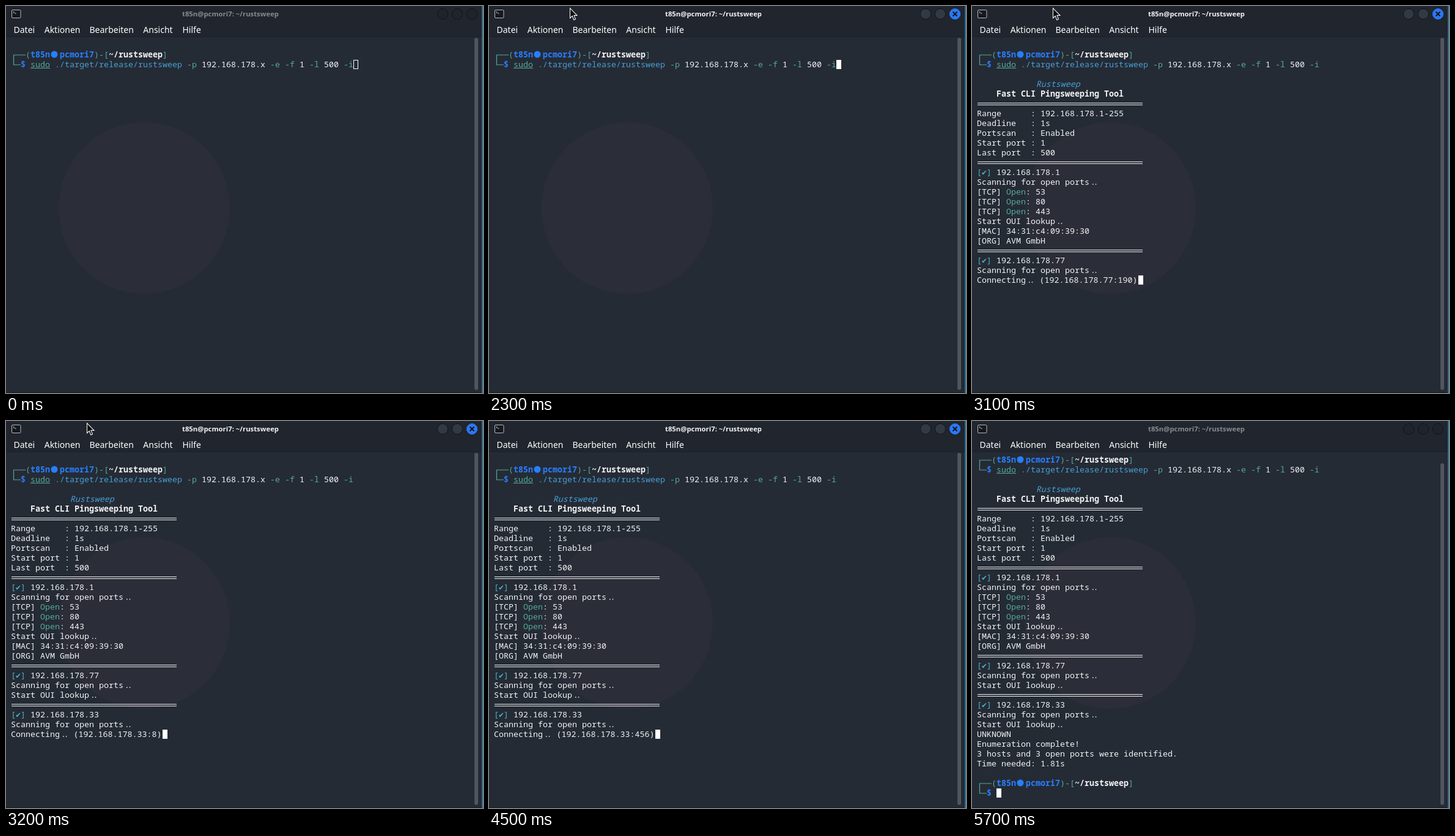
These frames come from a looping animation (780 px wide and 632 px high, 5800 ms). An HTML page:

```html
<!DOCTYPE html>
<html lang="de">
<head>
<meta charset="utf-8">
<title>rustsweep</title>
<style>
html, body { margin: 0; width: 100%; height: 100%; overflow: hidden; background: #252b35; }
svg { display: block; width: 780px; height: 632px; }
text { white-space: pre; }
.mono { font: 13.333px "Noto Sans Mono", "DejaVu Sans Mono", monospace; fill: #f2f3f4; }
.menu { font: 500 14px "Noto Sans", "Open Sans", sans-serif; fill: #fff; }
.title { font: 700 11.33px "Noto Sans", "Open Sans", sans-serif; fill: #868a90; text-anchor: middle; }
.focus .title { fill: #f2f3f4; }
.b { font-weight: 700; }
.i { font-style: italic; }
.green { fill: #54a99a; }
.cyan { fill: #469fd4; }
.teal { fill: #4eb0c0; }
.blue { fill: #277fff; }
.rule { fill: #f2f3f4; }
.frame { fill: none; stroke: #54a99a; stroke-width: 1.2; }
.btn { fill: #1f242c; stroke: #11141a; }
.focus .btn { fill: #323945; }
.focus .close { fill: #2a78f5; stroke: #2a78f5; }
.cross { stroke: #10151d; stroke-width: 2; display: none; }
.focus .cross { display: inline; }
</style>
</head>
<body>
<svg viewBox="0 0 780 632">
  <rect width="780" height="632" fill="#252b35"/>
  <circle cx="226" cy="330" r="140" fill="#2b2d38"/>
  <rect width="780" height="51" fill="#20252e"/>
  <rect y="50" width="780" height="1" fill="#1c2129"/>
  <rect x="778" width="2" height="632" fill="#2f7196"/>
  <rect y="631" width="778" height="1" fill="#171b22"/>
  <g id="bar">
    <rect x="9.5" y="6.5" width="14.5" height="13" rx="1.5" fill="#15181d" stroke="#b9bcc0"/>
    <path d="M11.8 9l1.6 1.3-1.6 1.3M14.2 12h2.2" fill="none" stroke="#e4e5e6"/>
    <text class="title" x="367" y="17">t85n@pcmori7: ~/rustsweep</text>
    <circle class="btn" cx="714" cy="13" r="8.6"/>
    <circle class="btn" cx="738" cy="13" r="8.6"/>
    <circle class="btn close" cx="762" cy="13" r="8.6"/>
    <path class="cross" d="M758.5 9.5l7 7m0-7l-7 7"/>
  </g>
  <g class="menu">
    <text x="12.5" y="43.5">Datei</text>
    <text x="62.7" y="43.5">Aktionen</text>
    <text x="136.5" y="43.5">Bearbeiten</text>
    <text x="224.3" y="43.5">Ansicht</text>
    <text x="288.5" y="43.5">Hilfe</text>
  </g>
  <rect id="scroll" x="766" y="52" width="6" height="575" rx="3" fill="#50555e"/>
  <g id="screen" class="mono"></g>
  <path id="mouse" d="M0 0V16.2L3.7 12.8 6.3 19.2 9 18 6.4 11.9H11.5Z" fill="#0a0a0a" stroke="#f5f5f5" stroke-width="1.1"/>
</svg>
<script>
const LOOP = 5800, CELL = 8, ROW = 16;
const $ = id => document.getElementById(id);
const colX = c => 8 + c * CELL;
const midY = r => 63 + r * ROW;

// A pair of dots is set tighter, as in a ligature font
const dots = s => s.replace(/\.\.(?=$| )/, '<tspan dx="1.7">.</tspan><tspan dx="-3.2">.</tspan>');
const put = (row, col, str, cls = '') =>
  `<text class="${cls}" x="${colX(col)}" y="${midY(row) + 5}">${dots(str)}</text>`;
const rule = row => [-1, 2].map(d =>
  `<rect class="rule" x="9" y="${midY(row) + d}" width="270" height="1"/>`).join('');
const host = (row, ip) =>
  put(row, 0, '[✔]', 'teal') + put(row, 4, ip) + put(row + 1, 0, 'Scanning for open ports..');
const port = (row, n) =>
  put(row, 0, '[TCP]') + put(row, 6, 'Open', 'green') + put(row, 10, ': ' + n);
const field = (row, name, value) => put(row, 0, name.padEnd(11) + ': ' + value);
const lookup = row => put(row, 0, 'Start OUI lookup..');
const connect = (row, ip, n) => {
  const s = `Connecting.. (${ip}:${n})`;
  return put(row, 0, s) + cursor(row, s.length, true);
};

function cursor(row, col, solid) {
  const x = colX(col), y = midY(row) - 7;
  return solid
    ? `<rect x="${x}" y="${y}" width="8" height="15" fill="#fff"/>`
    : `<rect x="${x + .5}" y="${y + .5}" width="7" height="14" fill="none" stroke="#fff"/>`;
}

function prompt(row) {
  const y = midY(row);
  return `<path class="frame" d="M32 ${y + 1}H12.5V${y + 17}H24"/>` +
    put(row, 3, '(', 'green') + put(row, 4, 't85n', 'blue b') +
    `<circle class="blue" cx="79" cy="${y}" r="5.5"/>` +
    put(row, 10, 'pcmori7', 'blue b') + put(row, 17, ')-[', 'green') +
    put(row, 20, '~/rustsweep', 'b') + put(row, 31, ']', 'green') +
    put(row + 1, 2, '$', 'blue b');
}

const command = prompt(1) +
  put(2, 4, 'sudo', 'green') + `<rect class="green" x="40" y="${midY(2) + 6}" width="32" height="1"/>` +
  put(2, 9, './target/release/rustsweep', 'cyan') +
  put(2, 36, '-p', 'green') + put(2, 39, '192.168.178.x') +
  put(2, 53, '-e -f', 'green') + put(2, 59, '1') +
  put(2, 61, '-l', 'green') + put(2, 64, '500') + put(2, 68, '-i', 'green');

const header = put(4, 12.1, 'Rustsweep', 'cyan i') + put(5, 4, 'Fast CLI Pingsweeping Tool', 'b') +
  rule(6) + field(7, 'Range', '192.168.178.1-255') + field(8, 'Deadline', '1s') +
  field(9, 'Portscan', 'Enabled') + field(10, 'Start port', 1) + field(11, 'Last port', 500) +
  rule(12) + host(13, '192.168.178.1');

const second = lookup(18) + put(19, 0, '[MAC] 34:31:c4:09:39:30') + put(20, 0, '[ORG] AVM GmbH') +
  rule(21) + host(22, '192.168.178.77');

const third = lookup(24) + rule(25) + host(26, '192.168.178.33');

const summary = lookup(28) + put(29, 0, 'UNKNOWN') + put(30, 0, 'Enumeration complete!') +
  put(31, 0, '3 hosts and 3 open ports were identified.') + put(32, 0, 'Time needed: 1.81s') +
  prompt(34) + cursor(35, 4, true);

function content(t) {
  if (t < 2800) return command + cursor(2, 70, t >= 2200);
  let out = command + header;
  const first = 1 + Math.round((t - 2800) * 2);
  const open = [53, 80, 443].filter(n => n < first || t >= 3050);
  out += open.map((n, i) => port(15 + i, n)).join('');
  if (t < 3050) return out + connect(15 + open.length, '192.168.178.1', first);
  out += second;
  if (t < 3180) return out + connect(24, '192.168.178.77', Math.round((t - 3050) * 3.8));
  out += third;
  if (t < 4600) return out + connect(28, '192.168.178.33', Math.round(8 + (t - 3200) * 448 / 1300));
  return out + summary;
}

function moveMouse(t) {
  const k = Math.min(1, (t - 1900) / 400), ease = k * (2 - k);
  const drift = Math.max(0, Math.min(1, (t - 3400) / 500));
  const x = 125.5 + 7 * ease + 3 * drift, y = -3.5 + 7 * ease;
  $('mouse').setAttribute('transform', `translate(${x} ${y})`);
  $('mouse').style.display = t >= 1900 && t < 4300 ? '' : 'none';
}

let last = -1;
function tick() {
  const t = Math.floor(performance.now() % LOOP / 100) * 100;
  if (t !== last) {
    last = t;
    const done = t >= 4600;
    $('screen').innerHTML = content(t);
    $('screen').setAttribute('transform', `translate(0 ${done ? -ROW : 0})`);
    $('scroll').setAttribute('y', done ? 69 : 52);
    $('scroll').setAttribute('height', done ? 558 : 575);
    $('bar').setAttribute('class', t >= 2200 && t < 5700 ? 'focus' : '');
    moveMouse(t);
  }
  requestAnimationFrame(tick);
}
tick();
</script>
</body>
</html>
```
